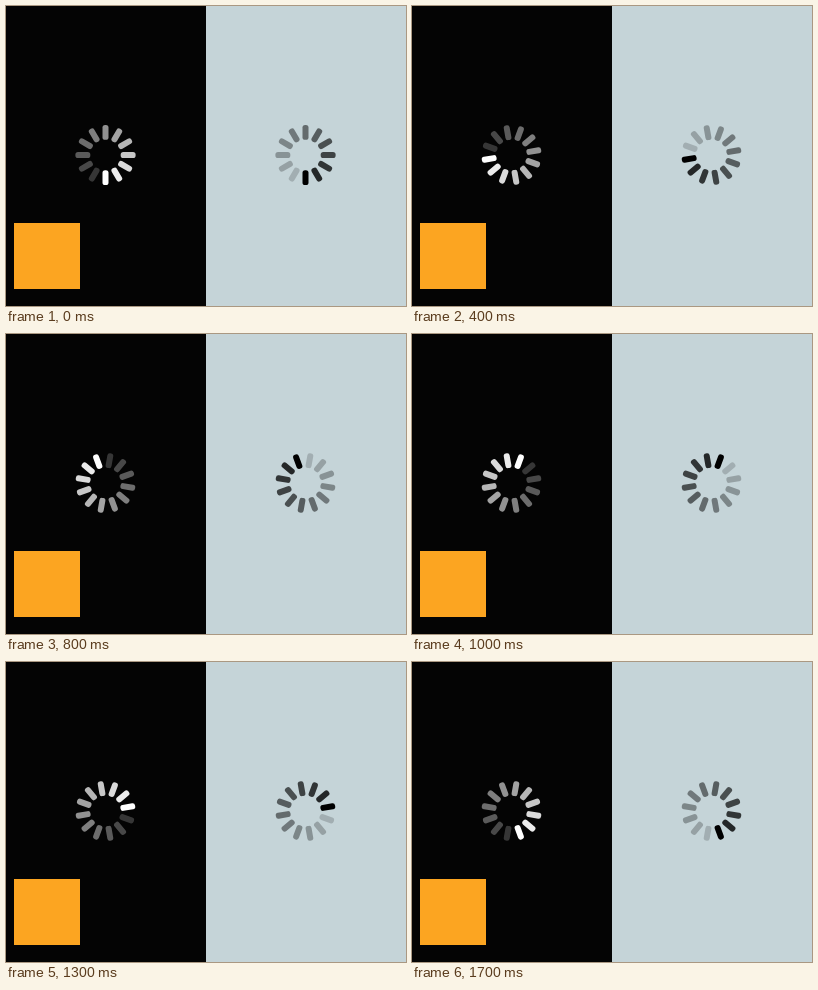
These frames come from a looping animation (400x300 px, 1.8 s). An HTML page:

```html
<!DOCTYPE html>
<html lang="en">
<head>
<meta charset="utf-8">
<title>Loading spinners</title>
<style>
  html, body { margin: 0; width: 100%; height: 100%; overflow: hidden; }
  svg { display: block; width: 100vw; height: 100vh; }
</style>
</head>
<body>
<svg id="stage" viewBox="0 0 400 300">
  <rect width="200" height="300" fill="#040404"/>
  <rect x="200" width="200" height="300" fill="#c5d4d8"/>
  <rect x="8" y="217" width="66" height="66" fill="#fca521"/>
</svg>
<script>
  const LOOP = 1800, STEP = 100, BARS = 12;
  const stage = document.getElementById('stage');

  function add(parent, name, attrs) {
    const el = document.createElementNS('http://www.w3.org/2000/svg', name);
    for (const key in attrs) el.setAttribute(key, attrs[key]);
    return parent.appendChild(el);
  }

  // The head points down; the tail fades counterclockwise behind it.
  function makeSpinner(x, y, color, tail) {
    const place = add(stage, 'g', { transform: `translate(${x} ${y})` });
    const wheel = add(place, 'g', { fill: color });
    for (let i = 0; i < BARS; i++) {
      const fade = 1 - 0.8 * i / (BARS - 1);
      add(wheel, 'rect', {
        x: -3, y: 15.2, width: 6, height: 14.9, rx: 2.6,
        transform: `rotate(${-i * 360 / BARS})`,
        'fill-opacity': i ? tail * fade : 1
      });
    }
    return wheel;
  }

  const wheels = [
    makeSpinner(99.5, 149, '#fff', 1),
    makeSpinner(299.5, 149, '#000', 0.88)
  ];

  function draw(ms) {
    const angle = Math.floor((ms % LOOP) / STEP) * STEP / LOOP * 360;
    for (const wheel of wheels) wheel.setAttribute('transform', `rotate(${angle})`);
  }

  const start = performance.now();
  function tick() {
    draw(performance.now() - start);
    requestAnimationFrame(tick);
  }
  draw(0);
  requestAnimationFrame(tick);
</script>
</body>
</html>
```
